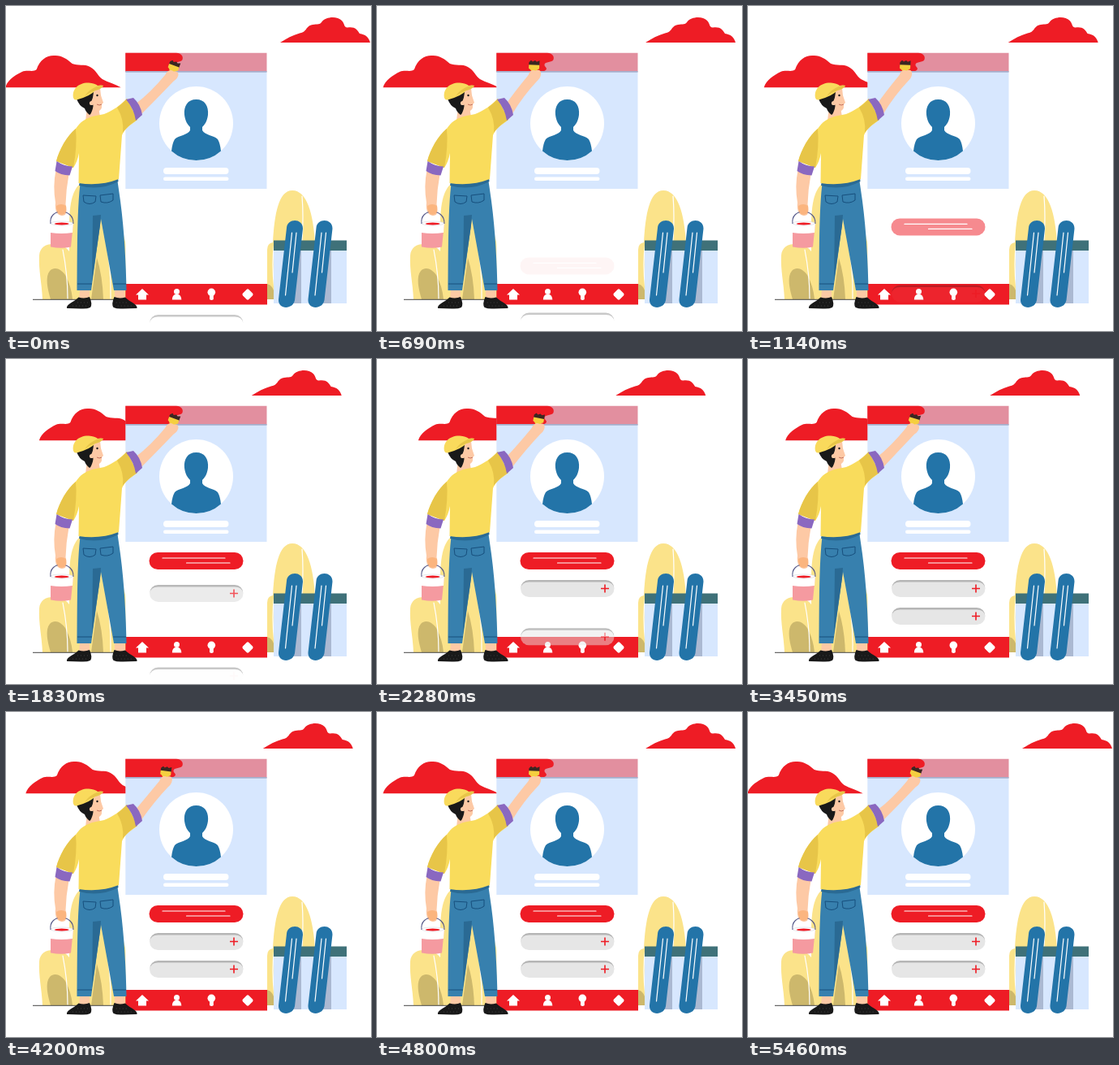
An HTML page for the animation above (5490 ms loop, 450 px wide and 400 px high).

```html
<!DOCTYPE html>
<html lang="en">
<head>
<meta charset="utf-8">
<title>Painting an app screen</title>
<style>
html, body { margin: 0; width: 100%; height: 100%; overflow: hidden; background: #fff; }
svg { display: block; width: 450px; height: 400px; }
.red { fill: #ee1c25; }
.blue { fill: #2374a8; }
.denim { fill: #3780ae; }
.shade { fill: #2a6a94; }
.pale { fill: #d7e7fe; }
.leaf { fill: #fbe38a; }
.olive { fill: #cdb86c; }
.skin { fill: #fdc9a5; }
.shirt { fill: #f9dc5c; }
.fold { fill: #e7c548; }
.cuff { fill: #8a68c0; }
.white { fill: #fff; }
.dark { fill: #191919; }
.line { fill: none; stroke: #fff; stroke-width: 1.2; stroke-linecap: round; }
.seam { fill: none; stroke: #174f7d; stroke-width: 1; }
</style>
</head>
<body>
<svg viewBox="0 0 450 400">
  <defs>
    <rect id="field" x="177" width="115.5" height="21" rx="10.5" fill="#e6e6e6"/>
    <path id="rim" d="M177 10.500A10.500 10.500 0 0 1 187.500 0H282A10.500 10.500 0 0 1 292.500 10.500Q291 2.500 282 2.500H187.500Q178.500 2.500 177 10.500Z" opacity=".21"/>
    <path id="plus" d="M276 10.500H286M281 5.500V15.500" fill="none" stroke="#ee1c25" stroke-width="1.6"/>
    <g id="slat">
      <path class="blue" d="M346 273C347 261 366 261 366 274L356 362C354 374 335 374 336 361Z"/>
      <path class="line" d="M352.500 279L344.500 356M358 279L353 328"/>
    </g>
    <g id="shoe">
      <path class="dark" d="M75 372C74 367 83 365 89.500 358.500Q97 360.500 103 358Q107 367 104 371Q100 373 92 372.500Z"/>
      <path d="M82 369H101M88 365H101" fill="none" stroke="#666" stroke-width=".7" stroke-dasharray=".7 3.300"/>
    </g>
  </defs>

  <path id="cloudLeft" class="red" d="M-.500 100.200C2 91 12 85 20 81C27 78 34 82 38 78C42 66 51 60.500 60 61C69 60.500 75 65 82 71C89 74 97 71 104 75C112 79 113 86 119 90C126 94 135 96 142 100.200Z"/>
  <path id="cloudRight" class="red" d="M338 45C346 40 353 36 362 33.500C371 32 369 26 376 23.500C382 21.500 386 24 389 20C394 13 408 12 414 18C418 22 416 26 421 26.500C430 25 433 29 436 34C443 35 447 38 449 45Z"/>

  <!-- plants -->
  <path class="leaf" d="M78 361V270C78 238 84 216 101 216C126 216 138 255 148 294V361Z"/>
  <path class="leaf" d="M45 361C44 340 40 325 41 307C42 294 54 291 65 294C80 297 89 312 88 361Z"/>
  <path class="olive" d="M55 361C51 348 48 333 54 326C60 320 68 324 73 331C78 340 81 350 82 361ZM105 361L112 310Q119 332 120 361Z"/>
  <path class="line" d="M70 300Q76 330 76 360M122 280Q130 322 129 360" stroke-width=".9"/>
  <path class="leaf" d="M322 361V300Q322 292 329 291C331 256 336 227 353 227C371 227 379 256 381 292V361Z"/>
  <path class="olive" d="M322 361V342Q328 344 330 350V361Z"/>
  <path class="line" d="M365 234Q367 259 365 289M331 291Q327 315 331 350" stroke-width=".8"/>
  <path d="M33 361.300H148" stroke="#444" stroke-width="1"/>

  <!-- phone screen -->
  <path class="white" d="M147.300 224H321.500V343H147.300Z"/>
  <path fill="#e28f9f" d="M147.300 57.700H321.500V81H147.300Z"/>
  <path class="pale" d="M147.300 81H321.500V225H147.300Z"/>
  <path class="red" d="M147.300 57.700H210C216 58 219 62 217.500 66C216 70 207 68 206.500 72C206 75 211 76 208 79Q206 81 200 80.500H147.300Z"/>
  <path d="M147.300 80.800H321.500" stroke="#a6aecb" stroke-width="1.800"/>
  <circle class="white" cx="234.500" cy="144.500" r="45.500"/>
  <path class="blue" d="M234.500 115C245 115 250 123 249 134C248 142 245 146 242 149V153C245 159 256 159 261 164Q264 169 265 178.500Q252 190 234.500 190T204 178.500Q205 169 208 164C213 159 224 159 227 153V149C224 146 221 142 220 134C219 123 224 115 234.500 115Z"/>
  <rect class="white" x="194" y="199" width="80.500" height="8" rx="4"/>
  <rect class="white" x="194" y="210.500" width="80.500" height="4.600" rx="2.300"/>
  <path class="red" d="M147.300 342H322V367.500H147.300Z"/>
  <g class="white">
    <path d="M160 355.500L168 348L176 355.500H173V361.500H163V355.500Z"/>
    <circle cx="210.500" cy="351.500" r="3.500"/>
    <path d="M204.800 361.500Q205 356 208.500 355H212.500Q216 356 216.300 361.500Z"/>
    <circle cx="253.300" cy="352.300" r="4.800"/>
    <path d="M251 356H255.800V361Q253.400 363 251 361Z"/>
    <rect x="292.800" y="349.800" width="10.400" height="10.400" rx="2" transform="rotate(45 298 355)"/>
  </g>

  <!-- rising buttons -->
  <g id="button0">
    <g class="fade">
      <rect class="red" x="176.500" width="116" height="21" rx="10.500"/>
      <path class="line" d="M193 7H270M222.500 13H276"/>
    </g>
  </g>
  <g id="button1"><g class="fade"><use href="#field"/><use href="#plus"/></g><use href="#rim"/></g>
  <g id="button2"><g class="fade"><use href="#field"/><use href="#plus"/></g><use href="#rim"/></g>

  <!-- crate -->
  <path class="pale" d="M330 300H420V366H330Z"/>
  <path fill="#abb9d2" d="M350 300H364V366H345ZM387 300H401V366H382Z"/>
  <path fill="#3f7179" d="M330 288.500H420V301H330Z"/>
  <use href="#slat"/>
  <use href="#slat" x="36.500"/>

  <!-- painter: legs -->
  <path class="skin" d="M91 349H103V361H90ZM134 349H146L147 361H134Z"/>
  <use href="#shoe"/>
  <use href="#shoe" transform="translate(236.500) scale(-1 1)"/>
  <path class="denim" d="M92 215Q116 222 137 212L141 240C146 278 148 318 148.500 350H133L117 262L105 350H87.500C88 320 87 250 92 215Z"/>
  <path class="shade" d="M107 258L117 257L116 270L106 339ZM91 215Q116 222 138 211L138.500 216Q116 228 90 221Z"/>
  <path class="seam" d="M88 342H106M132 342H148M95 233L111 234L110 241Q103 246 96 241ZM116 233L132 231V239Q125 244 117 241Z"/>

  <!-- bucket arm -->
  <path class="skin" d="M61.500 202L77.500 207Q74 226 73.500 244Q76 252 73 257Q67 260 63 255Q60 250 61 242Q57.500 222 61.500 202Z"/>
  <path d="M55 296.500L55 267H83L80 296.500Q68 299 55.500 296.500Z" fill="#f59aa0"/>
  <path class="white" d="M54.500 267H83L82 279Q68 281 55 279Z"/>
  <ellipse cx="68.700" cy="267.500" rx="14" ry="2.500" fill="#fff" stroke="#d5d5e0" stroke-width=".6"/>
  <ellipse class="red" cx="68.700" cy="268" rx="9" ry="1.500"/>
  <path d="M55 268C52 248 84 248 83 268" fill="none" stroke="#555889" stroke-width="1.100"/>
  <path d="M62 246Q68 242 74 246V253Q72 258 66 256.500Q62 254 62 246Z" fill="#fbb57f"/>

  <!-- brush arm -->
  <path id="forearm" class="skin"/>
  <g id="hand">
    <path d="M-6.500 -17L-4 -19.500L-2 -18L1 -19.500L3 -18L6.500 -19.500V-13H-6.500Z" fill="#3b2722"/>
    <path d="M-6.500 -14H6.500V-9.500Q3 -8 2.500 -4H-2.500Q-3 -8 -6.500 -9.500Z" fill="#f5cf3f"/>
    <path class="skin" d="M-6 -3Q-3 -9 2 -7Q8 -10 9 -4Q9 3 3 6Q-3 10 -7 5Z"/>
  </g>

  <!-- torso -->
  <path class="skin" d="M100 125H114L116 136L98 141Z"/>
  <path class="shirt" d="M86 151C92 142 98 139 106 136L121 133C132 129 142 121 149 114L162 140C154 146 146 151 143 159L139 213Q116 222 89.500 218L90 181Q88 192 83 199L62 191C66 176 75 160 86 151Z"/>
  <path class="fold" d="M137 125Q144 120 149 114L162 140Q150 147 144 156Q146 140 137 125ZM86 151Q88 172 83 199L62 191C66 176 75 160 86 151Z"/>
  <path class="cuff" d="M148 115L157 113Q166 121 168 134L160 141Q158 127 148 115ZM62.500 191Q71 197 82 197.500L78.500 208.500Q67 208 60.500 203Z"/>

  <!-- head -->
  <path class="skin" d="M99 101H116L117 110L120 119L118 121Q119 129 112 130L103 129Z"/>
  <path class="dark" d="M87 114L99 103H108Q108 114 104 119Q109 120 107 126Q105 133 103 134Q98 130 97 126Q90 123 87 114Z"/>
  <circle class="skin" cx="105.500" cy="119.500" r="2.600"/>
  <path d="M83 113C81 102 90 94 102 94.500Q110 95 113 98Q117 97 120 98Q118 102 110 104Q104 111 87 115.500Q84 116 83 113Z" fill="#f9da5c"/>
  <path d="M112 99Q117 97 120 98Q118 102 110 104Q103 106 97 111Q102 103 112 99Z" fill="#e7c548"/>
  <circle class="dark" cx="112.500" cy="110" r="1.200"/>
  <path d="M112 121Q115 123 118 121" fill="none" stroke="#b65d4d" stroke-width=".8"/>
</svg>
<script>
const LOOP = 5490, STROKE = LOOP / 3, RISE = 1520, DROP = 108;
const buttons = [
  { y: 238, start: 90 },
  { y: 272, start: 540 },
  { y: 306, start: 1250 }
];
const el = id => document.getElementById(id);
const clamp = v => Math.min(1, Math.max(0, v));
const wave = p => (1 - Math.cos(2 * Math.PI * p)) / 2;
const ease = p => wave(p / 2);
const set = (node, transform) => node.setAttribute("transform", transform);

buttons.forEach((b, i) => {
  b.node = el("button" + i);
  b.fade = b.node.querySelector(".fade");
});

function draw(t) {
  const drift = wave(t / LOOP);
  set(el("cloudLeft"), `translate(${55.5 * drift - 0.3})`);
  set(el("cloudRight"), `translate(${-47 * drift})`);

  for (const b of buttons) {
    const p = clamp((t - b.start) / RISE);
    set(b.node, `translate(0 ${b.y + DROP * (1 - ease(p))})`);
    b.fade.setAttribute("opacity", clamp((p - 0.37) / 0.63));
  }

  const back = wave(t / STROKE);
  const x = 202.5 - 11 * back, y = 86.5;
  set(el("hand"), `translate(${x} ${y}) rotate(${20 * (1 - back)})`);
  el("forearm").setAttribute("d",
    `M159 121Q${x - 25} ${y + 21} ${x - 6} ${y - 2}L${x + 6} ${y + 4}Q${x - 13} ${y + 24} 166 134Z`);
}

const begin = performance.now();
function tick() {
  draw((performance.now() - begin) % LOOP);
  requestAnimationFrame(tick);
}
tick();
</script>
</body>
</html>
```
